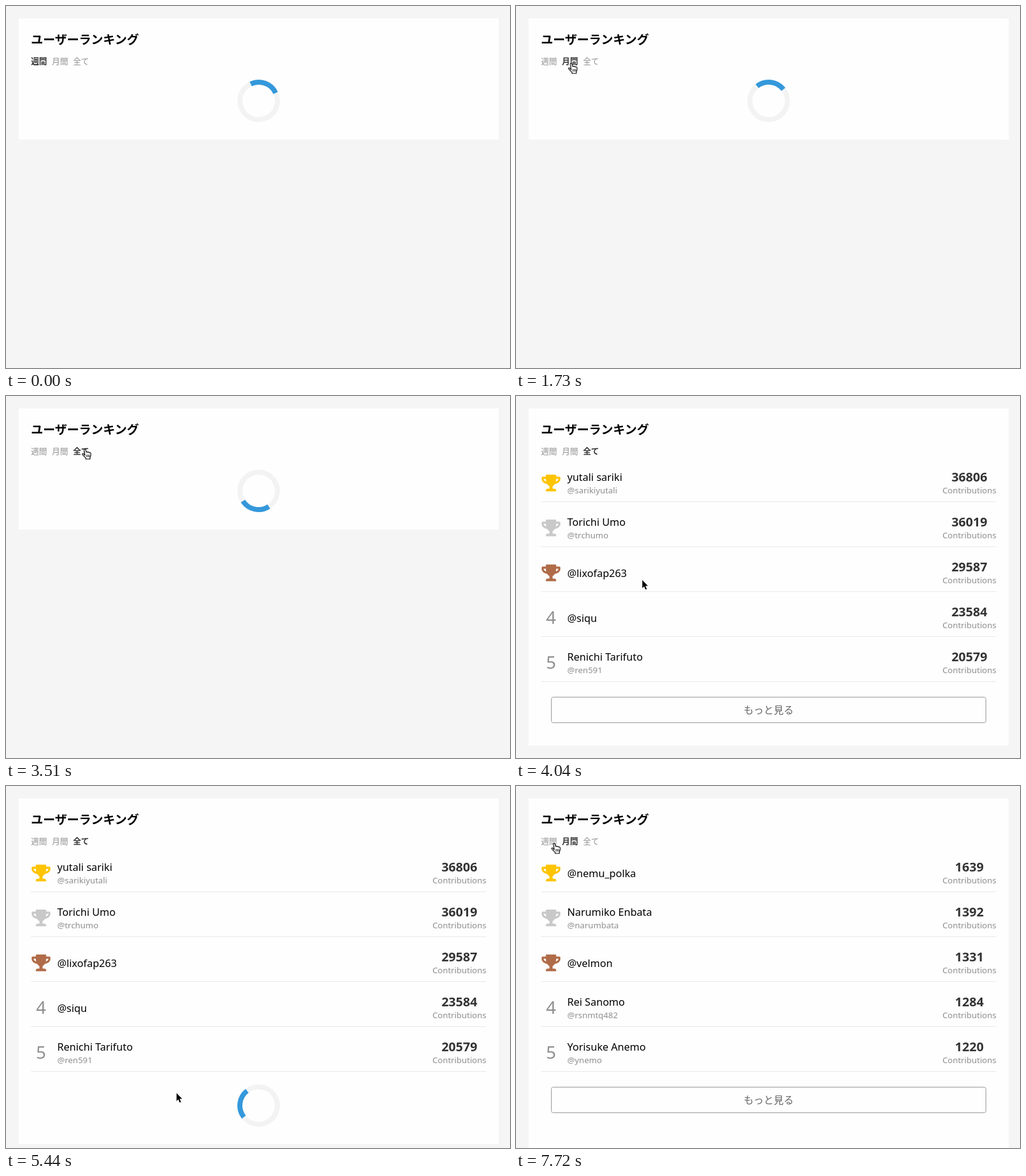
Write an HTML page that moves like this. It is 806 px wide and 580 px high and loops after 8000 ms.

```html
<!DOCTYPE html>
<html lang="ja">
<head>
<meta charset="utf-8">
<title>ユーザーランキング</title>
<style>
  html, body { margin: 0; width: 100%; height: 100%; overflow: hidden; background: #f5f5f5; }
  svg { display: block; }
  text { font: 13.4px "Noto Sans", "Noto Sans CJK JP", sans-serif; fill: #8e8e8e; }
  .title { font-size: 19.3px; font-weight: 700; fill: #000; }
  .tab { font-size: 12.8px; }
  .active { font-weight: 700; fill: #333; }
  .name { font-size: 16.5px; fill: #000; }
  .rank { font-size: 28px; font-weight: 300; }
  .count { font-size: 20px; font-weight: 600; fill: #333; }
  .more { font-size: 16px; fill: #666; }
  .rank, .count, .more, .unit { text-anchor: middle; }
</style>
</head>
<body>
<svg id="stage" width="806" height="580" viewBox="0 0 806 580"></svg>
<script>
const LOOP = 8000;
const STEP = 62.5; // ms between screen updates
const TABS = ['週間', '月間', '全て'];
const TROPHY_COLORS = ['#ffc400', '#c9c9c9', '#b06c49'];

// Each row: count, name, optional handle
const monthly = [
  [1639, '@nemu_polka'],
  [1392, 'Narumiko Enbata', '@narumbata'],
  [1331, '@velmon'],
  [1284, 'Rei Sanomo', '@rsnmtq482'],
  [1220, 'Yorisuke Anemo', '@ynemo'],
];
const weekly = monthly.map(([count, ...user]) => [Math.round(count * 0.3), ...user]);
const allTime = [
  [36806, 'yutali sariki', '@sarikiyutali'],
  [36019, 'Torichi Umo', '@trchumo'],
  [29587, '@lixofap263'],
  [23584, '@siqu'],
  [20579, 'Renichi Tarifuto', '@ren591'],
];
const allTimeMore = [
  ...allTime,
  [20129, ...allTime[0].slice(1)],
  [19019, ...allTime[1].slice(1)],
];

// spin is the spinner's starting angle in degrees
const SCENES = [
  { at: 0, tab: 0, rows: [], spin: 20 },
  { at: 890, tab: 0, rows: weekly },
  { at: 1730, tab: 1, rows: [], spin: 7 },
  { at: 2590, tab: 1, rows: monthly },
  { at: 3010, tab: 2, rows: [], spin: 12 },
  { at: 3870, tab: 2, rows: allTime },
  { at: 4690, tab: 2, rows: allTime, spin: 7 },
  { at: 5500, tab: 2, rows: allTimeMore },
  { at: 7450, tab: 1, rows: monthly, height: 600 },
];

// The pointer appears at the first place, then glides to each next one
const MOVES = [
  { from: 590, to: 590, x: 240, y: 60 },
  { from: 590, to: 1070, x: 88, y: 91 },
  { from: 2050, to: 2350, x: 126, y: 84 },
  { from: 3510, to: 4460, x: 272, y: 491 },
  { from: 6270, to: 6560, x: 70, y: 35 },
  { from: 6600, to: 6930, x: 87, y: 77 },
  { from: 7100, to: 7220, x: 88, y: 91 },
  { from: 7450, to: 7690, x: 61, y: 91 },
];

const stage = document.getElementById('stage');
const text = (cls, x, y, value) => `<text class="${cls}" x="${x}" y="${y}">${value}</text>`;
const ease = p => p * p * (3 - 2 * p);

function trophy(color) {
  return `<g transform="translate(41 126) scale(.0521)" fill="${color}">
    <path d="M128 24Q128 0 152 0H424Q448 0 448 24V110C448 230 400 320 336 360V432H384Q448 436 448 488V500
      Q448 512 436 512H140Q128 512 128 500V488Q128 436 192 432H240V360C176 320 128 230 128 110Z"/>
    <path d="M140 96H32V144C32 200 100 250 180 256M436 96H544V144C544 200 476 250 396 256"
      fill="none" stroke="${color}" stroke-width="64" stroke-linejoin="round"/></g>`;
}

function row([count, name, handle], i) {
  return `<g transform="translate(0 ${72 * i})">
    ${i < 3 ? trophy(TROPHY_COLORS[i]) : text('rank', 56, 149, i + 1)}
    ${text('name', 82, handle ? 136 : 146, name)}
    ${handle ? text('', 82, 156, handle) : ''}
    ${text('count', 725, 136.5, count)}
    ${text('unit', 725, 156, 'Contributions')}
    <rect x="40" y="169" width="728" height="1" fill="#e8e8e8"/></g>`;
}

function spinner(y, angle) {
  return `<g transform="translate(404 ${y}) rotate(${angle - 135})" fill="none" stroke-width="8">
    <circle r="30" stroke="#f3f3f3"/>
    <circle r="30" stroke="#3498db" pathLength="4" stroke-dasharray="1 3"/></g>`;
}

function moreButton() {
  return `<rect x="56.5" y="482.5" width="695" height="41" rx="3" fill="none" stroke="#999"/>
    ${text('more', 404, 509, 'もっと見る')}`;
}

function pointer(time) {
  if (time < MOVES[0].from) return '';
  let { x, y } = MOVES[0];
  for (const move of MOVES.slice(1)) {
    const p = ease(Math.min(1, Math.max(0, (time - move.from) / (move.to - move.from))));
    x += (move.x - x) * p;
    y += (move.y - y) * p;
  }
  const overTabs = x < 135 && y > 80 && y < 100;
  return overTabs
    ? `<g transform="translate(${x - 5} ${y})" fill="#fff" stroke="#000" stroke-width="1.1" stroke-linejoin="round">
        <path d="M5.2 11.2L3.9 2.6C3.6 .5 6.2 .2 6.6 2.2L7.3 6.2C7.6 4.8 9.6 4.9 9.8 6.4C10.3 5.3 12.1 5.6 12.2 7
          C13 6.2 14.6 6.7 14.7 8.2C15 11 14.4 12.6 13.4 14.4V17H6.6V15.4C5 13.6 3 12 1.2 9.6C.4 8.2 2.2 7.4 3.4 8.8Z"/>
        <path d="M8 10V14M10.2 10V14M12.2 10V14" stroke-width=".9"/></g>`
    : `<path transform="translate(${x} ${y}) scale(.93)" fill="#000" stroke="#fff" paint-order="stroke" stroke-width="2"
        d="M.8 1.2V15L3.8 11.9L6.2 17.4L8.5 16.4L6.1 11H10.4Z"/>`;
}

function draw(now) {
  const { at, tab, rows, spin, height } = SCENES.filter(scene => scene.at <= now).pop();
  const elapsed = Math.floor((now - at) / STEP) * STEP;
  const spinning = spin !== undefined;
  const panelHeight = height || 72 * rows.length + (spinning ? 194 : 180);
  stage.innerHTML = `<rect x="20" y="20" width="768" height="${panelHeight}" fill="#fefefe"/>
    ${text('title', 40, 61, 'ユーザーランキング')}
    ${TABS.map((label, i) => text(i === tab ? 'tab active' : 'tab', 40 + 33.6 * i, 93, label)).join('')}
    ${rows.map(row).join('')}
    ${spinning ? spinner(152 + 72 * rows.length, spin + elapsed * 0.36) : ''}
    ${!spinning && rows.length === 5 ? moreButton() : ''}
    ${pointer(at + elapsed)}`;
}

function tick() {
  draw(performance.now() % LOOP);
  requestAnimationFrame(tick);
}
tick();
</script>
</body>
</html>
```
